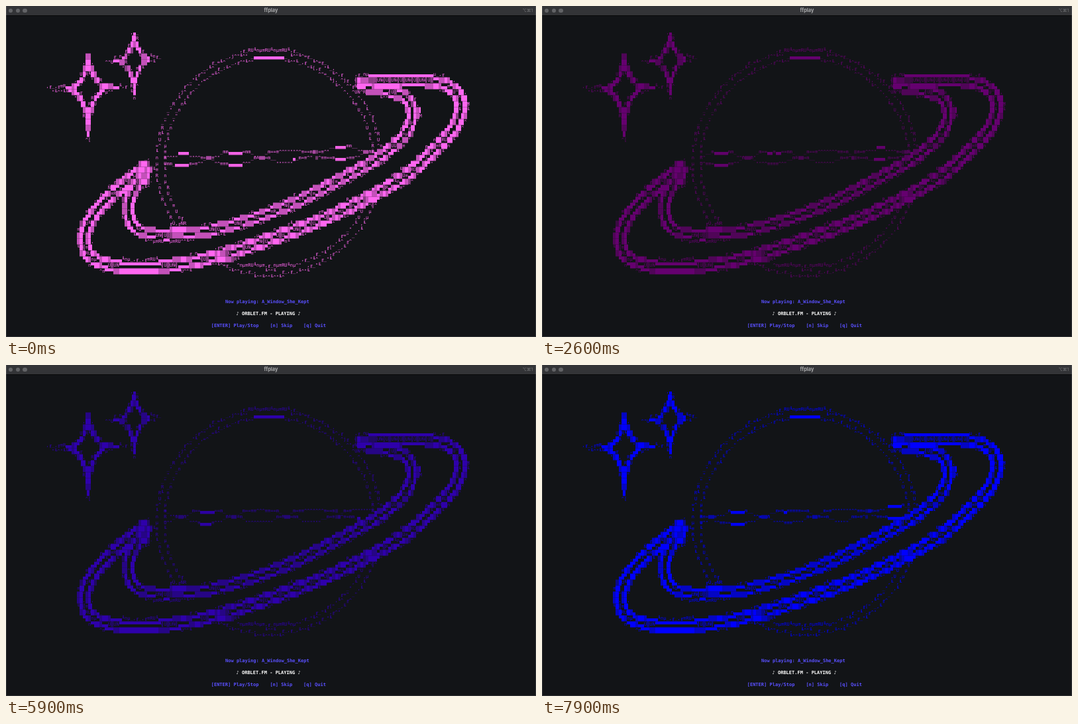
An HTML page with a canvas that plays this animation: 800x499 px, repeating every 8 s.

```html
<!DOCTYPE html>
<html lang="en">
<head>
<meta charset="utf-8">
<title>ffplay</title>
<style>
  html, body { margin: 0; width: 100%; height: 100%; overflow: hidden; background: #121417; }
  #stage { position: relative; width: 800px; height: 499px; overflow: hidden; background: #121417; }
  #stage::after { content: ""; position: absolute; inset: 0; border: 1px solid rgba(255,255,255,.13); border-top: 0; }
  #art { position: absolute; left: 0; top: 0; }
  .bar { position: absolute; left: 0; top: 0; width: 800px; height: 14px; background: #333437; border-bottom: 1px solid #08090a;
    font: 700 7.4px/14px Inter, sans-serif; color: #a9aaab; text-align: center; }
  .dot { position: absolute; top: 3.8px; width: 6.4px; height: 6.4px; border-radius: 50%; background: #626366; }
  .keys { position: absolute; right: 5px; top: 0; font: 6.4px/14px Inter, "DejaVu Sans", sans-serif; color: #77787a; }
  .line { position: absolute; white-space: pre; font: 700 7.03px/9px "DejaVu Sans Mono", monospace; color: #5a50ff; }
  .white { color: #fff; }
</style>
</head>
<body>
<div id="stage">
  <canvas id="art" width="800" height="499"></canvas>
  <div class="bar">ffplay
    <i class="dot" style="left:4px"></i><i class="dot" style="left:14.6px"></i><i class="dot" style="left:25.2px"></i>
    <span class="keys">⌥⌘1</span>
  </div>
  <div class="line" style="left:331px;top:440.5px">Now playing: A_Window_She_Kept</div>
  <div class="line white" style="left:347.5px;top:458.5px">♪ ORBLET.FM - PLAYING ♪</div>
  <div class="line" style="left:309.7px;top:476.5px">[ENTER] Play/Stop    [n] Skip    [q] Quit</div>
</div>
<script>
const CW = 4.233, CH = 9, X0 = 1.3, Y0 = 17.5, COLS = 170, ROWS = 45;
const SX = 8, SY = 16; // mask samples per character cell
const LOOP = 8000, STEP = 100;

const outerRing = [
  [530,116],[560,113],[600,112],[640,113],[668,121],[684,137],[686,158],[675,185],[650,214],
  [603,256],[550,287],[500,312],[450,333],[400,351],[350,368],[300,382],[250,391],[200,394],
  [160,391],[130,380],[119,360],[121,335],[137,308],[165,280],[195,255],[218,238]];
const innerRing = [
  [543,123],[575,128],[600,136],[612,152],[612,172],[601,195],[580,215],[550,237],[500,264],
  [450,290],[400,311],[350,328],[300,340],[250,345],[215,343],[194,333],[185,312],[187,290],
  [197,270],[212,250]];
const shades = [[527,108,18,22],[552,117,20,9],[200,236,18,36],[250,329,20,18],[540,280,20,18],[318,372,16,16]];
const colors = [
  [0, 255,102,240], [1600, 175,39,177], [2600, 101,0,111], [3200, 75,0,130],
  [5200, 75,0,130], [6500, 22,0,206], [7500, 0,0,255], [LOOP, 0,0,255]];

function makeCanvas(w, h) {
  const c = document.createElement('canvas');
  c.width = w; c.height = h;
  return c.getContext('2d', { willReadFrequently: true });
}

function smooth(g, pts) {
  const at = i => pts[Math.max(0, Math.min(pts.length - 1, i))];
  g.beginPath();
  g.moveTo(...pts[0]);
  for (let i = 0; i < pts.length - 1; i++) {
    const [a, b, c, d] = [at(i - 1), at(i), at(i + 1), at(i + 2)];
    g.bezierCurveTo(b[0] + (c[0] - a[0]) / 6, b[1] + (c[1] - a[1]) / 6,
      c[0] - (d[0] - b[0]) / 6, c[1] - (d[1] - b[1]) / 6, c[0], c[1]);
  }
}

function ring(g, pts, width, gap) {
  smooth(g, pts);
  g.lineWidth = width;
  g.stroke();
  g.globalCompositeOperation = 'destination-out';
  g.lineWidth = gap;
  g.stroke();
  g.globalCompositeOperation = 'source-over';
}

function star(g, cx, cy, top, bottom, left, right, width) {
  g.beginPath();
  g.moveTo(cx, top);
  g.quadraticCurveTo(cx - 4, cy - 3, left, cy);
  g.quadraticCurveTo(cx - 6, cy + 3, cx, bottom);
  g.quadraticCurveTo(cx + 5, cy + 3, right, cy - 2);
  g.quadraticCurveTo(cx + 5, cy - 4, cx, top);
  g.lineWidth = width;
  g.stroke();
}

function arc(g, r, from, to, width) {
  g.beginPath();
  g.arc(397, 236.5, r, from, to);
  g.lineWidth = width;
  g.stroke();
}

function drawMask() {
  const g = makeCanvas(COLS * SX, ROWS * SY);
  g.setTransform(SX / CW, 0, 0, SY / CH, -X0 * SX / CW, -Y0 * SY / CH);
  g.strokeStyle = g.fillStyle = '#fff';
  for (const r of [169.5, 158]) {
    arc(g, r, 2.48, 6.22, 1.6);
    arc(g, r, 0.3, 2, 1.6);
  }
  arc(g, 169.5, -1.82, -1.32, 3.2);
  arc(g, 158, 1.3, 1.85, 3.2);
  g.fillRect(374, 76, 46, 4.5);
  ring(g, outerRing, 20, 5);
  ring(g, innerRing, 18, 5);
  star(g, 124, 125, 73, 178, 92, 158, 7);
  star(g, 193.5, 82, 41, 124, 167, 219, 5.5);
  g.fillStyle = 'rgba(255,255,255,.55)';
  for (const s of shades) g.fillRect(...s);
  return g.getImageData(0, 0, COLS * SX, ROWS * SY).data;
}

function block(g, col, row, alpha, x = 0, y = 0, w = 1, h = 1) {
  const l = Math.round(X0 + (col + x) * CW), r = Math.round(X0 + (col + x + w) * CW);
  g.globalAlpha = alpha;
  g.fillRect(l, Y0 + (row + y) * CH, r - l, h * CH);
  g.globalAlpha = 1;
}

function glyph(g, col, row, ch) {
  g.fillText(ch, X0 + col * CW, Y0 + row * CH + 6.9);
}

function prepare(g) {
  g.font = '7.03px "DejaVu Sans Mono", monospace';
  g.fillStyle = '#fff';
  return g;
}

// Average mask coverage of the four quarters of a cell
function quarters(data, col, row) {
  const q = [0, 0, 0, 0];
  for (let y = 0; y < SY; y++)
    for (let x = 0; x < SX; x++) {
      const i = (row * SY + y) * COLS * SX + col * SX + x;
      q[(y >= SY / 2) * 2 + (x >= SX / 2)] += data[i * 4 + 3];
    }
  return q.map(v => v / (255 * SX * SY / 4));
}

function pick(chars, n) {
  return chars[n % chars.length];
}

function drawCell(g, col, row, [a, b, c, d]) {
  const cover = (a + b + c + d) / 4;
  if (cover < 0.05) return;
  const top = (a + b) / 2, low = (c + d) / 2, left = (a + c) / 2, right = (b + d) / 2;
  const n = col * 7 + row * 13;
  if (cover > 0.82) block(g, col, row, 1);
  else if (top > 0.8 && low < 0.3) block(g, col, row, 1, 0, 0, 1, 0.5);
  else if (low > 0.8 && top < 0.3) block(g, col, row, 1, 0, 0.5, 1, 0.5);
  else if (left > 0.82 && right < 0.3) block(g, col, row, 1, 0, 0, 0.5, 1);
  else if (right > 0.82 && left < 0.3) block(g, col, row, 1, 0.5, 0, 0.5, 1);
  else if (cover > 0.64) block(g, col, row, 0.75);
  else if (cover > 0.5) block(g, col, row, 0.5);
  else if (cover > 0.4) glyph(g, col, row, pick('ÜÑ▒╣U', n));
  else if (cover > 0.3) glyph(g, col, row, pick('≡RU╙nμ', n));
  else if (top > low * 2) glyph(g, col, row, pick('^"╙', n));
  else if (low > top * 2) glyph(g, col, row, pick('_,╓', n));
  else glyph(g, col, row, pick(cover > 0.18 ? '=nj[' : '-:.', n));
}

function drawPlanet() {
  const g = prepare(makeCanvas(800, 499)), data = drawMask();
  for (let row = 0; row < ROWS; row++)
    for (let col = 0; col < COLS; col++) drawCell(g, col, row, quarters(data, col, row));
  glyph(g, 164, 14, 'M');
  glyph(g, 147, 16, 'M');
  block(g, 147, 15, 1, 0, 0, 0.5, 1);
  return g.canvas;
}

// Two mirrored sine strands travelling across the planet
function drawWave(g, t) {
  const turn = t / 3600;
  const tilt = 0.6 + 0.4 * Math.cos(turn * 2 * Math.PI);
  for (let col = 56; col < 131; col++) {
    const x = X0 + (col + 0.5) * CW;
    const swing = Math.sin(Math.PI * ((x - 305) / 80 - 7 * turn));
    const mid = 227 - tilt * 7 * (x - 395) / 155;
    for (const side of [-1, 1]) {
      const pos = (mid + side * 9 * swing - Y0) / CH;
      const row = Math.floor(pos), part = pos - row;
      if (Math.abs(swing) > 0.92 && part > 0.4) block(g, col, row, 0.95, 0, 0.5, 1, 0.5);
      else if (Math.abs(swing) < 0.17) block(g, col, row, 0.4, 0, 0.2, 1, 0.6);
      else glyph(g, col, row, pick('"^≡=m_', Math.floor(part * 6)));
    }
  }
}

function colorAt(t) {
  const i = colors.findIndex(c => c[0] > t);
  const from = colors[i - 1], to = colors[i];
  const k = (t - from[0]) / (to[0] - from[0]);
  return `rgb(${[1, 2, 3].map(n => Math.round(from[n] + (to[n] - from[n]) * k))})`;
}

const g = prepare(document.getElementById('art').getContext('2d'));
const planet = drawPlanet();
let last = -1;

function frame() {
  const t = Math.floor(performance.now() % LOOP / STEP) * STEP;
  if (t !== last) {
    last = t;
    g.clearRect(0, 0, 800, 499);
    g.drawImage(planet, 0, 0);
    g.fillStyle = '#fff';
    drawWave(g, t);
    g.globalCompositeOperation = 'source-in';
    g.fillStyle = colorAt(t);
    g.fillRect(0, 0, 800, 499);
    g.globalCompositeOperation = 'source-over';
  }
  requestAnimationFrame(frame);
}
frame();
</script>
</body>
</html>
```
